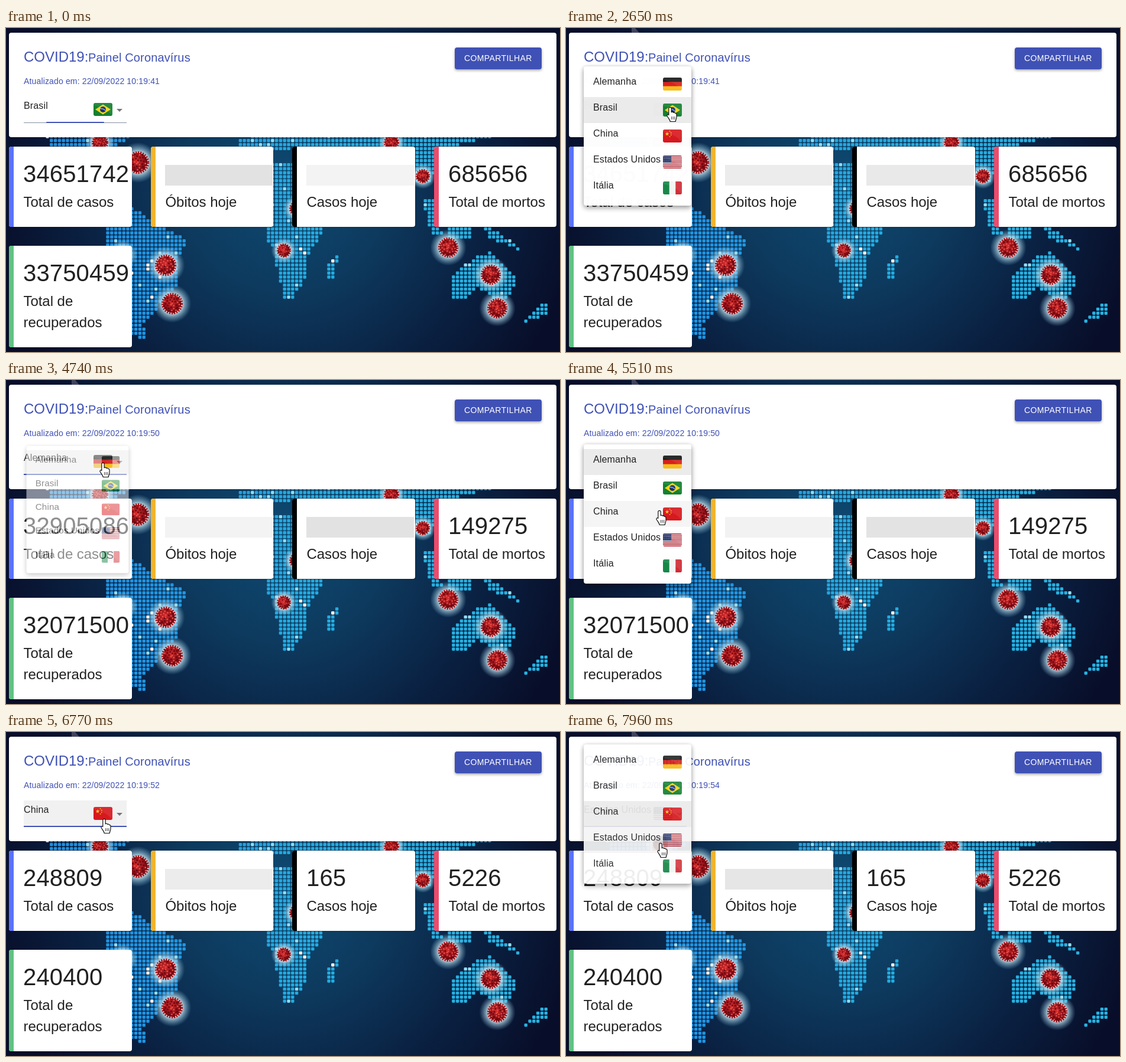
An HTML page for the animation above (8 s loop, 937 by 549 pixels).

```html
<!DOCTYPE html>
<html lang="pt-BR">
<head>
<meta charset="utf-8">
<title>Painel</title>
<style>
  html, body { margin: 0; width: 100%; height: 100%; overflow: hidden; background: #0a1230; }
  svg { display: block; width: 100%; height: 100%; }
  text { font-family: "Liberation Sans", Arial, sans-serif; fill: #212121; white-space: pre; }
  .card { filter: drop-shadow(0 1px 1px rgba(0,0,0,.25)); }
  .title { font-size: 24px; fill: #3f51b5; }
  .sub { font-size: 20px; letter-spacing: .0075em; fill: #3f51b5; }
  .date { font-size: 14px; letter-spacing: .01071em; fill: #3f51b5; }
  .body { font-size: 16px; letter-spacing: .00938em; }
  .button { font-size: 14px; letter-spacing: .02857em; fill: #fff; }
  .number { font-size: 40px; letter-spacing: .004em; }
  .label { font-size: 24px; letter-spacing: -.002em; }
  .raised { filter: drop-shadow(0 2px 2px rgba(0,0,0,.35)); }
  .paper { filter: drop-shadow(0 4px 5px rgba(0,0,0,.28)) drop-shadow(0 1px 3px rgba(0,0,0,.2)); }
</style>
</head>
<body>
<svg id="stage" viewBox="0 0 937 549" preserveAspectRatio="none">
  <defs>
    <radialGradient id="sea" gradientUnits="userSpaceOnUse" cx="470" cy="270" r="500">
      <stop offset="0" stop-color="#0f4a72"/><stop offset=".35" stop-color="#0d3a5e"/>
      <stop offset=".7" stop-color="#0a2041"/><stop offset="1" stop-color="#080e29"/>
    </radialGradient>
    <linearGradient id="land" gradientUnits="userSpaceOnUse" x1="100" y1="0" x2="860" y2="0">
      <stop offset="0" stop-color="#1e8fdf"/><stop offset=".25" stop-color="#2095e2"/>
      <stop offset=".5" stop-color="#22aae0"/><stop offset="1" stop-color="#27b1e0"/>
    </linearGradient>
    <radialGradient id="glow">
      <stop offset=".45" stop-color="#f4fcff"/>
      <stop offset=".65" stop-color="#bfe2f0" stop-opacity=".6"/>
      <stop offset="1" stop-color="#7fc4e4" stop-opacity="0"/>
    </radialGradient>
    <radialGradient id="germ" cx=".45" cy=".4">
      <stop offset="0" stop-color="#d52b2b"/><stop offset="1" stop-color="#7c0b14"/>
    </radialGradient>
    <clipPath id="flagShape"><rect width="32" height="22" rx="3"/></clipPath>
    <clipPath id="rowShape"><rect id="rippleRow" x="30" width="182" height="44"/></clipPath>
  </defs>
</svg>
<script>
const LOOP = 8000;
const stage = document.getElementById('stage');
const defs = stage.querySelector('defs');

function el(tag, attrs = {}, parent = stage, text) {
  const node = document.createElementNS('http://www.w3.org/2000/svg', tag);
  set(node, attrs);
  if (text !== undefined) node.textContent = text;
  return parent.appendChild(node);
}
function set(node, attrs) {
  for (const key in attrs) node.setAttribute(key, attrs[key]);
}
const show = (node, visible) => { node.style.display = visible ? '' : 'none'; };
const rect = (x, y, width, height, fill, more = {}, parent = stage) =>
  el('rect', { x, y, width, height, fill, ...more }, parent);
const label = (cls, x, y, text, parent = stage) => el('text', { class: cls, x, y }, parent, text);
const range = n => [...Array(n).keys()];

function seeded(seed) {
  return () => (seed = (seed * 16807) % 2147483647) / 2147483647;
}

// --- Background map: a dot grid clipped to rough coastlines ---
rect(0, 0, 937, 549, 'url(#sea)');

const lands = [
  '67,182 215,182 180,204 78,204',
  '168,338 215,304 245,325 309,362 288,394 288,440 232,500 240,530 213,520 205,480 168,370',
  '388,193 415,182 830,182 740,204 718,264 500,264 500,204 410,206',
  '440,228 492,228 536,345 512,384 512,410 486,459 470,459 452,376 440,358',
  '543,400 562,384 554,426 543,424',
  '703,290 724,290 738,352 722,354',
  '744,338 790,338 788,356 748,354',
  '806,338 832,342 870,377 820,358',
  '750,425 795,386 822,379 864,425 850,456 832,461 800,440 776,458 750,458',
  '912,462 917,485 870,502 890,484'
].map(shape => shape.split(' ').map(point => point.split(',').map(Number)));

function inside(x, y, shape) {
  let hit = false;
  shape.forEach(([ax, ay], i) => {
    const [bx, by] = shape[(i + 1) % shape.length];
    if (ay > y !== by > y && x < (bx - ax) * (y - ay) / (by - ay) + ax) hit = !hit;
  });
  return hit;
}

const PITCH = 6.8;
const dots = { 'url(#land)': '', '#8fdcf3': '', '#fff': '' };
const chance = seeded(73);
for (let y = 184; y < 549; y += PITCH) {
  for (let x = 70; x < 930; x += PITCH) {
    if (!lands.some(shape => inside(x, y, shape))) continue;
    const roll = chance();
    const fill = roll < .012 ? '#fff' : roll < .035 ? '#8fdcf3' : 'url(#land)';
    dots[fill] += `M${x - 1.3} ${y - 2.7}h2.6q1.4 0 1.4 1.4v2.6q0 1.4-1.4 1.4h-2.6q-1.4 0-1.4-1.4v-2.6q0-1.4 1.4-1.4z`;
  }
}
for (const fill in dots) el('path', { d: dots[fill], fill });

function virus(x, y, r) {
  const rnd = seeded(x * 31 + y);
  const g = el('g', { transform: `translate(${x} ${y})` });
  el('circle', { r: r * 1.8, fill: 'url(#glow)' }, g);
  el('circle', { r: r * .9, fill: 'none', stroke: '#a8161c', 'stroke-width': r * .22, 'stroke-dasharray': '2.4 1.6' }, g);
  el('circle', { r: r * .85, fill: 'url(#germ)' }, g);
  for (let i = 0; i < 34; i++) {
    const a = i * 2.4, d = r * .86 * Math.sqrt(i / 34);
    el('circle', { cx: Math.cos(a) * d, cy: Math.sin(a) * d, r: r * .075,
      fill: rnd() < .55 ? '#ea5048' : '#65070f' }, g);
  }
}
'159,194,14 223,228,19 652,194,13 705,251,12 492,306,13 470,377,12 197,384,14 270,402,18 281,467,18 748,372,17 820,418,17 831,475,17'
  .split(' ').forEach(spot => virus(...spot.split(',').map(Number)));

const smudge = el('path', { d: 'M111 0h6l7 8h-13z', fill: '#40435c' });

// --- Countries and flags ---
const box = (x, y, w, h, fill) => `<rect x="${x}" y="${y}" width="${w}" height="${h}" fill="${fill}"/>`;
function star(x, y, r) {
  const points = range(10).map(i => {
    const a = i * Math.PI / 5, k = i % 2 ? r * .4 : r;
    return [x + k * Math.sin(a), y - k * Math.cos(a)];
  });
  return `<polygon points="${points}" fill="#f8d021"/>`;
}
const smallStars = range(4).map(i => {
  const a = (i - 1.5) * .65;
  return star(8.5 + 5.5 * Math.cos(a), 7.5 + 5.5 * Math.sin(a), 1.4);
}).join('');
const stripes = range(7).map(i => box(0, i * 3.4, 32, 1.8, '#b3202f')).join('');
const stateDots = range(12).map(i =>
  `<circle cx="${2 + i % 4 * 3.3}" cy="${2 + (i >> 2) * 3.7}" r=".6" fill="#d8dcea"/>`).join('');

const countries = [
  { name: 'Alemanha', cases: '32905086', casesToday: '', deaths: '149275', recovered: '32071500',
    art: box(0, 0, 32, 8, '#181818') + box(0, 7.3, 32, 8, '#d8201c') + box(0, 14.6, 32, 8, '#f6bd1c') },
  { name: 'Brasil', cases: '34651742', casesToday: '', deaths: '685656', recovered: '33750459',
    art: box(0, 0, 32, 22, '#138030') + '<path d="M3 11L16 2.5 29 11 16 19.5z" fill="#f5d416"/>' +
      '<circle cx="16" cy="11" r="5" fill="#17336f"/><path d="M11.3 9.6q5-.6 9.2 3.3" fill="none" stroke="#e8eef2"/>' },
  { name: 'China', cases: '248809', casesToday: '165', deaths: '5226', recovered: '240400',
    art: box(0, 0, 32, 22, '#d7191e') + star(7, 7.5, 3.6) + smallStars },
  { name: 'Estados Unidos',
    art: box(0, 0, 32, 22, '#f1eeee') + stripes + box(0, 0, 14, 11.9, '#2b3767') + stateDots },
  { name: 'Itália',
    art: box(0, 0, 11, 22, '#168748') + box(10.7, 0, 11, 22, '#f4f4f2') + box(21.3, 0, 11, 22, '#cf2b34') }
];
countries.forEach(({ art }, i) => {
  el('g', { id: 'flag' + i, 'clip-path': 'url(#flagShape)' }, defs).innerHTML =
    art + '<path d="M0 0H32V22Q22 8 0 4z" fill="#fff" opacity=".08"/>';
});

// --- Header ---
rect(5, 8, 926, 177, '#fff', { rx: 4, class: 'card' });
label('title', 30, 57, 'COVID19:');
label('sub', 139, 57, 'Painel Coronavírus');
const updated = label('date', 30, 95, '');
rect(759, 33, 147, 37, '#3f51b5', { rx: 4, class: 'raised' });
label('button', 775, 56, 'COMPARTILHAR');

const focusBox = rect(30, 116, 174, 44, '#000', { 'fill-opacity': .055 });
const chosen = label('body', 30, 137, '');
const chosenFlag = el('use', { x: 148, y: 127 });
el('path', { d: 'M187 137h10l-5 5z', fill: '#757575' });
const line = rect(30, 160, 174, 1, '#8590a0');
const focusLine = rect(30, 159, 174, 2, '#3f51b5');

// --- Cards: each returns a setter for its number or loading bar ---
function card(x, y, width, height, color, lines) {
  rect(x, y, width, height, '#fff', { rx: 4, class: 'card' });
  el('path', { d: `M${x + 8} ${y}h-4a4 4 0 0 0-4 4v${height - 8}a4 4 0 0 0 4 4h4z`, fill: color });
  lines.forEach((text, i) => label('label', x + 24.5, y + 102 + i * 36, text));
  const bar = rect(x + 24, y + 31, 182, 35, '#000');
  const number = label('number', x + 24, y + 60, '');
  return (text, shade = 0) => {
    number.textContent = text;
    bar.setAttribute('fill-opacity', text ? 0 : shade);
  };
}
const showCases = card(5, 201, 208, 136, '#5a72fb', ['Total de casos']);
const showDeathsToday = card(245, 201, 207, 136, '#f1b42c', ['Óbitos hoje']);
const showCasesToday = card(484, 201, 208, 136, '#000', ['Casos hoje']);
const showDeaths = card(724, 201, 207, 136, '#ec4b6c', ['Total de mortos']);
const showRecovered = card(5, 369, 208, 172, '#60c382', ['Total de', 'recuperados']);

// --- Menu ---
const ROW = 44;
const menu = el('g');
rect(30, 0, 182, 236, '#fff', { rx: 4, class: 'paper' }, menu);
const rows = countries.map(({ name }, i) => {
  const y = 8 + i * ROW;
  const row = rect(30, y, 182, ROW, '#000', {}, menu);
  label('body', 46, y + 23, name, menu);
  el('use', { href: '#flag' + i, x: 164, y: y + 11 }, menu);
  return row;
});
const ripple = el('circle', { 'clip-path': 'url(#rowShape)', 'fill-opacity': .1 }, menu);
const rippleRow = document.getElementById('rippleRow');

const cursor = el('g');
el('path', {
  d: 'M-2.2 1.5a2.2 2.2 0 0 1 4.4 0v6.2c1-.9 3.2-.6 3.6.8c1-.7 2.6-.3 2.9 1.1c1.2-.4 2.3.3 2.3 2v4.5c0 3-1.6 4-1.8 7.4h-9c-.4-3-3.2-6-5-9c-1.2-2 1-3.6 2.6-2.2z',
  fill: '#fff', stroke: '#111', 'stroke-width': 1.2, 'stroke-linejoin': 'round'
}, cursor);
el('path', { d: 'M2.6 15v5M5.2 15v5M7.8 15v5', stroke: '#111', 'stroke-width': .8 }, cursor);

// --- Timeline ---
const GROW = 290;
const FIRST = { country: 1, second: 41 };
const visits = [
  { open: 2400, close: 3748, country: 0, second: 50 },
  { open: 4640, close: 5800, country: 2, second: 52 },
  { open: 6910, close: 7915, country: 3, second: 54 }
];
const ENTER = 1320;
const stops = [
  { at: 1810, x: 167, y: 130 }, { at: 2150, x: 176, y: 135 }, { at: 3550, x: 162, y: 102 },
  { at: 4500, x: 164, y: 141 }, { at: 5510, x: 158, y: 222 }, { at: 6560, x: 166, y: 148 },
  { at: 7540, x: 160, y: 189 }
];

// cubic-bezier(.4, 0, .2, 1)
function ease(p) {
  p = Math.max(0, Math.min(1, p));
  let lo = 0, hi = 1;
  for (let i = 0; i < 14; i++) {
    const s = (lo + hi) / 2;
    const x = 1.2 * s * (1 - s) ** 2 + .6 * s * s * (1 - s) + s ** 3;
    if (x < p) lo = s; else hi = s;
  }
  return lo * lo * (3 - 2 * lo);
}
const pulse = (t, depth) => .08 + depth * Math.cos(2 * Math.PI * t / 9400);
const pickedBy = t => visits.filter(v => t >= v.close).pop() || FIRST;

function cursorAt(t) {
  let x = 116, y = -4;
  for (const stop of stops) {
    const p = ease((t - stop.at + 420) / 420);
    x += (stop.x - x) * p;
    y += (stop.y - y) * p;
  }
  return [x, y];
}

function renderMenu(t, visit, x, y) {
  show(menu, visit);
  if (!visit) return;
  const { open, close } = visit;
  const selected = pickedBy(open).country;
  const top = 109 - selected * ROW;
  const opacity = ease((t - open) / GROW) - ease((t - close) / GROW);
  const grow = ease((t - open) / (GROW * .667)) - ease((t - close - GROW / 3) / (GROW * .667));
  set(menu, {
    opacity,
    transform: `translate(121 139) scale(${.75 + .25 * grow} ${.5625 + .4375 * grow}) translate(-121 ${top - 139})`
  });
  const hover = Math.floor((y - top - 8) / ROW);
  rows.forEach((row, i) => row.setAttribute('fill-opacity', i === selected ? .08 : i === hover ? .04 : 0));
  rippleRow.setAttribute('y', 8 + hover * ROW);
  set(ripple, { cx: x, cy: y - top, r: 135 * ease((t - close + 50) / 550) });
}

function render(t) {
  const [x, y] = cursorAt(t);
  const visit = visits.find(v => t >= v.open && t < v.close + GROW);
  const picked = pickedBy(t);
  const stats = countries[pickedBy(t - GROW).country];

  updated.textContent = `Atualizado em: 22/09/2022 10:19:${picked.second}`;
  chosen.textContent = countries[picked.country].name;
  chosenFlag.setAttribute('href', '#flag' + picked.country);

  showCases(stats.cases);
  showDeathsToday('', pulse(t, .034));
  showCasesToday(stats.casesToday, pulse(t, -.034));
  showDeaths(stats.deaths);
  showRecovered(stats.recovered);

  show(focusBox, picked !== FIRST && !visit);
  const hovered = t >= 1700;
  set(line, { y: hovered ? 159 : 160, height: hovered ? 2 : 1 });
  const width = 174 * (.56 * (1 - ease(t / 200)) + ease((t - visits[0].open) / 200));
  set(focusLine, { x: 117 - width / 2, width });

  show(smudge, t >= ENTER);
  show(cursor, t >= ENTER);
  cursor.setAttribute('transform', `translate(${x} ${y})`);
  renderMenu(t, visit, x, y);
}

const start = performance.now();
function frame() {
  render((performance.now() - start) % LOOP);
  requestAnimationFrame(frame);
}
render(0);
requestAnimationFrame(frame);
</script>
</body>
</html>
```
